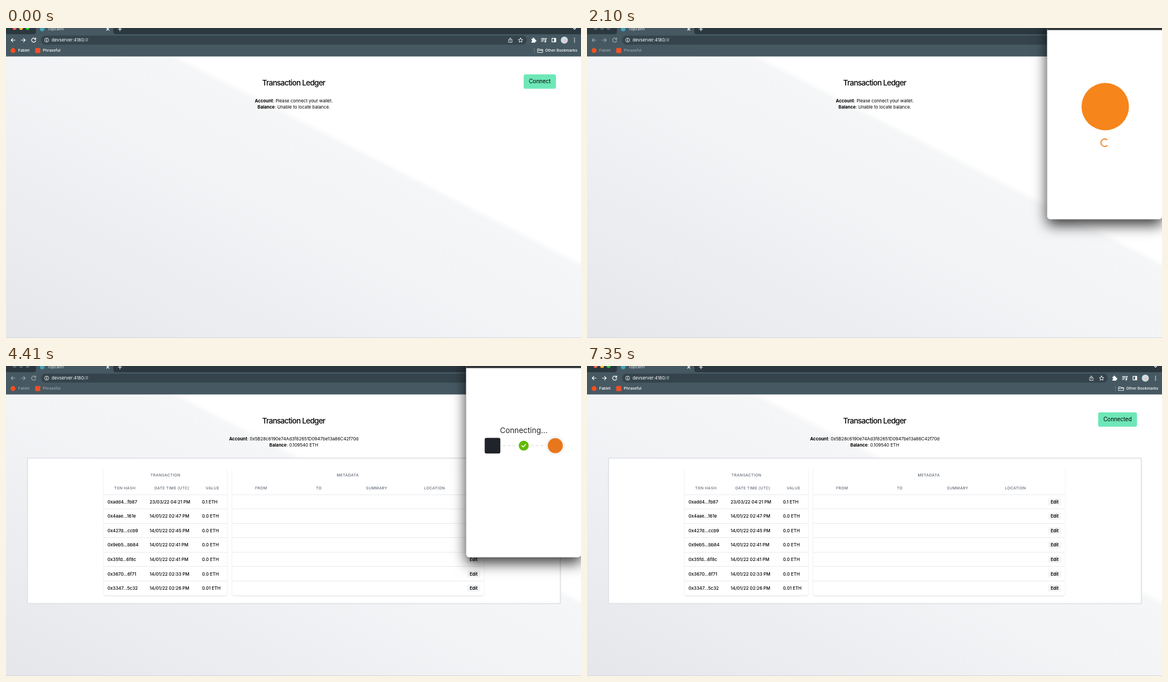
Write an HTML page that moves like this. It is 1018 px wide and 550 px high and loops after 7490 ms.

```html
<!DOCTYPE html>
<html lang="en">
<head>
<meta charset="utf-8">
<title>Transaction Ledger</title>
<style>
  html, body { margin: 0; width: 100%; height: 100%; overflow: hidden; }
  body { background: #fff; }
  svg { display: block; width: 1018px; height: 550px; font-family: Inter, "Open Sans", sans-serif; }
  text { white-space: pre; }
  .line { fill: none; stroke: #fff; stroke-width: 1.2; stroke-linecap: round; stroke-linejoin: round; }
  .blurred .chrome { opacity: .45; }
  .mid { text-anchor: middle; }
  .bold { font-weight: 700; }
  .semi { font-weight: 600; }
  .medium { font-weight: 500; }
  .head { text-anchor: middle; font-weight: 500; letter-spacing: .05em; fill: #636b78; }
  .window { filter: drop-shadow(0 0 .6px rgba(0,0,0,.5)) drop-shadow(0 10px 12px rgba(0,0,0,.78)); }
  .sheet { filter: drop-shadow(0 1px 1px rgba(0,0,0,.13)); }
</style>
</head>
<body>
<svg id="stage" viewBox="0 0 1018 550"></svg>
<script>
const LOOP = 7490, STEP = 70;
const OPEN = 840, READY = 2240, NEXT = 3500, LINKING = 3920, LINKED = 4060, DONE = 5180, CLOSED = 5320;
const ADDRESS = '0x5B28c6190e74Ad3f82651D0947be13a86C42f70d';
const SHORT = '0x5B2...f70d';
const HOST = 'devserver:4180';

// y is the middle of the capital letters
const txt = (x, y, size, s, cls = '', more = '') =>
  `<text x="${x}" y="${(y + size * .36).toFixed(2)}" font-size="${size}" class="${cls}" ${more}>${s}</text>`;
const rect = (x, y, w, h, fill, r = 0, more = '') =>
  `<rect x="${x}" y="${y}" width="${w}" height="${h}" fill="${fill}" rx="${r}" ${more}/>`;
const dot = (x, y, r, fill, more = '') => `<circle cx="${x}" cy="${y}" r="${r}" fill="${fill}" ${more}/>`;
const line = (d, more = '') => `<path class="line" d="${d}" ${more}/>`;
const rule = (x, y, w, color) => rect(x, y, w, 1, color);
const during = (from, to, s) => `<g data-from="${from}" data-to="${to}">${s}</g>`;
const outside = (from, to, s) => during(0, from, s) + during(to, LOOP, s);

function backdrop() {
  // The gradient follows the diagonal of the page, which is a little taller than the view
  const w = 1018, h = 522, k = w * h / (w * w + h * h);
  const x = h * k, y = w * k, middle = 50 + h / 2;
  return `<linearGradient id="sky" gradientUnits="userSpaceOnUse"
      x1="${w / 2 - x}" y1="${middle + y}" x2="${w / 2 + x}" y2="${middle - y}">
      <stop offset="0" stop-color="#e5e6ea"/><stop offset=".5" stop-color="#f3f4f6"/>
      <stop offset=".64" stop-color="#f5f6f7"/><stop offset=".652" stop-color="#fff"/>
    </linearGradient>` + rect(0, 50, w, h, 'url(#sky)') + rule(0, 549, w, '#d3d5d8');
}

function browser() {
  const lights = colors => colors.map((c, i) => dot(15.2 + i * 11.5, 0, 3.4, c)).join('');
  const nav = line('M16 21.5H9.2M12.3 18.3l-3.2 3.2 3.2 3.2M27.2 21.5H34M30.9 18.3l3.2 3.2-3.2 3.2') +
    line('M52 19.3a3.7 3.7 0 1 0 .6 3.2M52.6 17.6v2.5h-2.5');
  const tools =
    '<path fill="#fff" d="M930.3 19.2h2.1a1.4 1.4 0 1 1 2.6 0h2v2.2a1.4 1.4 0 1 1 0 2.6v2h-6.7v-2.1a1.3 1.3 0 1 0 0-2.6z"/>' +
    line('M948 18.7h6M948 21.2h6M948 23.7h3M955.6 18.7v5.3M955.6 18.7h1.5') + dot(954.6, 24.2, 1.3, '#fff') +
    line('M966.6 18.3h6.8v6.4h-6.8z') + rect(970.4, 18.3, 3, 6.4, '#fff') +
    [18.3, 21.5, 24.7].map(y => dot(1006.5, y, .9, '#fff')).join('');
  const marks = txt(21.5, 39.8, 6.85, 'Fablet') + txt(65.3, 39.8, 6.85, 'Phraseful') +
    txt(954.5, 39.8, 6.85, 'Other Bookmarks');
  return rect(0, 0, 1018, 12, '#2b383f') +
    '<path fill="#465962" d="M49 11q4 0 4-4V-3H190V7q0 4 4 4z"/>' + rect(0, 11, 1018, 39.5, '#465962') +
    rect(62, 13.5, 860, 16, '#35444c', 8) +
    outside(OPEN, CLOSED, lights(['#ff5f57', '#febc2e', '#28c840'])) +
    during(OPEN, CLOSED, lights(['#55626a', '#55626a', '#55626a'])) +
    dot(64, 1.8, 4, '#43a5bd') + txt(73, 1.8, 7, 'Topcairn', '', 'fill="#e8ecee"') +
    line('M178.2 0l4 4M182.2 0l-4 4M198.7 2h6M201.7-1v6M1004.3 0l2.3 2.3 2.3-2.3') +
    `<g class="chrome" fill="#fff" font-weight="500">${nav + tools + marks}</g>` +
    line('M72 21.2v2M72 19.3v.1', 'stroke-width="1"') + dot(72, 21.5, 3.6, 'none', 'stroke="#dde3e6"') +
    txt(80.8, 21.6, 7.8, `${HOST}<tspan fill="#b3bdc2">/#</tspan>`, '', 'fill="#fff"') +
    line('M891.5 20.5h-1.6v5h6v-5h-1.6M892.9 23.2v-5.4M891.3 19.2l1.6-1.6 1.6 1.6', 'style="stroke-width:.8"') +
    line('M911 17.6l1.2 2.6 2.8.3-2.1 1.9.6 2.8-2.5-1.4-2.5 1.4.6-2.8-2.1-1.9 2.8-.3z', 'style="stroke-width:.9"') +
    dot(988.5, 21.5, 6.2, '#cbdfe6') + dot(989.5, 22.8, 3, '#e3c9cb') +
    dot(12.5, 40, 4.4, '#f4501f') + rect(51.7, 35.5, 9, 9, '#f1502b', 1) +
    rect(935, 35.5, 1, 9, '#687980') +
    line('M941.5 37h3l1 1.2h4.6v5.2h-8.6zM941.5 39.6h8.6', 'style="stroke-width:.9"');
}

function button(label, x, hover) {
  return rect(x, 82.3, 973.7 - x, 25.4, hover ? '#34d399' : '#6ee7b7', 3) +
    txt((x + 973.7) / 2, 95, 9.7, label, 'mid');
}

function summary(account, balance) {
  return txt(509.5, 129, 7.8, `<tspan class="bold">Account</tspan>: ${account}`, 'mid') +
    txt(509.5, 140.3, 7.8, `<tspan class="bold">Balance</tspan>: ${balance}`, 'mid');
}

function table() {
  const rows = [
    ['add4...fb87', '23/03/22 04:21', '0.1'], ['4aae...161e', '14/01/22 02:47', '0.0'],
    ['427d...ccb9', '14/01/22 02:45', '0.0'], ['9eb5...bb84', '14/01/22 02:41', '0.0'],
    ['35fd...6f8c', '14/01/22 02:41', '0.0'], ['3670...6f71', '14/01/22 02:33', '0.0'],
    ['3347...5c32', '14/01/22 02:26', '0.01']
  ];
  const heads = [['TXN HASH', 210.3], ['DATE TIME (UTC)', 293.7], ['VALUE', 365.7], ['FROM', 451.6],
    ['TO', 553.8], ['SUMMARY', 656.2], ['LOCATION', 758.7]];
  return rect(38, 163.5, 943.5, 258, '#fff', 1, 'stroke="#e2e3e8" stroke-width="2"') +
    rect(173, 182, 218.5, 225, '#fff', 4, 'class="sheet"') + rect(400.5, 182, 445.5, 225, '#fff', 4, 'class="sheet"') +
    txt(282.3, 194, 6.8, 'TRANSACTION', 'head') + txt(605, 194, 6.8, 'METADATA', 'head') +
    heads.map(([s, x]) => txt(x, 216.7, 6.8, s, 'head')).join('') +
    rows.map(([hash, date, value], i) => {
      const y = 241 + i * 25.55, top = Math.round(y - 13.3);
      return rule(173, top, 218.5, '#e8eaed') + rule(400.5, top, 445.5, '#e8eaed') +
        txt(179.7, y, 7.8, '0x' + hash, 'medium') + txt(254.3, y, 7.8, date + ' PM', 'medium') +
        txt(347, y, 7.8, value + ' ETH', 'medium') +
        rect(816.5, y - 6, 23, 12, '#f3f4f6', 2) + txt(828, y, 7.7, 'Edit', 'mid semi');
    }).join('');
}

function walletPage(step, body, label) {
  const site = rect(862.5, 24.5, 112, 26, '#fff', 13, 'stroke="#f3f4f5"') + rect(864, 28.3, 18.4, 18.4, '#20232a', 2) +
    txt(886.7, 37.5, 7.7, 'http://' + HOST, '', 'fill="#6a737d"');
  return site + body +
    txt(1010, 17, 6.6, step + ' of 2', 'semi', 'fill="#535a61" text-anchor="end"') +
    txt(844.7, 283.5, 6.6, 'Only connect with sites you trust.', '', 'fill="#6a737d"') +
    txt(952, 283.5, 6.6, 'Learn more', '', 'fill="#0376c9"') +
    rule(814.5, 295, 203.5, '#d6d9dc') +
    rect(824, 305.3, 70, 25, '#fff', 12.5, 'stroke="#8b929a"') +
    during(3850, LINKING, rect(824, 305.3, 70, 25, '#e8e9eb', 12.5, 'stroke="#7d848b"')) +
    txt(858.7, 318, 8.2, 'Cancel', 'mid', 'fill="#6a737d"') +
    rect(939.5, 305, 70.5, 25.5, '#0562a8', 12.75) +
    during(READY, 3150, rect(939.5, 305, 70.5, 25.5, '#0376c9', 12.75)) +
    during(3290, 3360, rect(939.5, 305, 70.5, 25.5, '#03528c', 12.75)) +
    during(3640, 3710, rect(939.5, 305, 70.5, 25.5, '#03528c', 12.75)) +
    txt(974.8, 318, 8.2, label, 'mid medium', 'fill="#fff"');
}

function wallet() {
  const dark = 'fill="#24272a"';
  const loading = dot(917.5, 139.5, 42, '#f6851b') +
    '<path id="spinner" d="M923.3 203.5a6.7 6.7 0 1 1-6.7-6.7" fill="none" stroke="#f0862a" stroke-width="1.9"/>';
  const choose = txt(916.5, 71, 13.2, 'Connect With Wallet', 'mid bold', dark) +
    txt(916.5, 90, 7.8, 'Select the account(s) to use on this site', 'mid', dark) +
    txt(1006, 122, 7.2, 'New Account', '', 'fill="#0376c9" text-anchor="end"') +
    rect(828.5, 131.5, 177, 34, '#fff', 4, 'stroke="#d6d9dc"') +
    rect(836, 144, 9, 9, '#0376c9', 1.5) + line('M838 148.5l1.9 1.9 3.2-3.5') +
    dot(859, 148.5, 8, '#3fb8b0') +
    txt(873, 144, 7.6, `Account 1 (${SHORT})`, '', dark) + txt(873, 154, 7, '0.109540 ETH', '', 'fill="#6a737d"');
  const confirm = line('M827 14.5l-2.4 2.5 2.4 2.5', 'style="stroke:#535a61"') +
    txt(833.3, 17, 7, 'Back', 'semi', 'fill="#535a61"') +
    txt(916.7, 71, 13.2, 'Connect to Account 1', 'mid bold', dark) + txt(916.7, 90, 13, `(${SHORT})`, 'mid bold', dark) +
    txt(916.7, 106.5, 7.8, 'Allow this site to:', 'mid', dark) +
    '<path d="M837.2 147.5q4.8-7 9.8 0q-5 7-9.8 0z" fill="#5d656d"/>' + dot(842.1, 147.5, 2.2, '#fff') + dot(842.1, 147.5, 1.2, '#5d656d') +
    txt(851.8, 142, 7.9, 'See address, account balance, activity', '', dark) +
    txt(851.8, 153, 7.9, 'and suggest transactions to approve', '', dark) + rule(828, 170, 178, '#d6d9dc');
  const linking = txt(916.6, 114, 13.4, 'Connecting...', 'mid', dark) +
    rect(847.5, 127.5, 27.7, 27.7, '#20232a', 3) +
    line('M880 141.3H906M930 141.3H956', 'style="stroke:#cdd1d6;stroke-width:1;stroke-dasharray:4 4.5"') +
    dot(916.6, 141.2, 8.8, '#61ba00') + line('M913.2 141.4l2.4 2.4 4.4-4.8', 'style="stroke-width:1.5"') +
    dot(972.5, 141.3, 17, '#f4f4f5') + dot(972.5, 141.3, 13.3, '#e8761b');
  return rect(814.5, -20, 204, 359.4, '#fff', 6, 'class="window"') + rect(814.5, 0, 204, 3.7, '#2d3236') +
    during(OPEN, READY, loading) +
    during(READY, NEXT, walletPage(1, choose, 'Next')) +
    during(NEXT, LINKING, walletPage(2, confirm, 'Connect')) +
    during(LINKING, DONE, linking);
}

const stage = document.getElementById('stage');
stage.innerHTML = backdrop() + browser() +
  txt(509.3, 96.7, 13.5, 'Transaction Ledger', 'mid medium', 'letter-spacing="-.75"') +
  during(0, LINKED, summary('Please connect your wallet.', 'Unable to locate balance.')) +
  during(0, 140, button('Connect', 916.5)) +
  during(140, LINKED, button('Connect', 916.5, true)) +
  during(LINKED, LOOP, summary(ADDRESS, '0.109540 ETH') + table() + button('Connected', 905)) +
  during(OPEN, CLOSED, wallet());

const parts = [...stage.querySelectorAll('[data-from]')];
const spinner = document.getElementById('spinner');

function draw() {
  const t = performance.now() % LOOP;
  for (const p of parts) p.style.display = t >= +p.dataset.from && t < +p.dataset.to ? '' : 'none';
  stage.classList.toggle('blurred', t >= OPEN && t < CLOSED + STEP);
  const tick = Math.floor(t / STEP) * STEP;
  spinner.setAttribute('transform', `rotate(${(tick - 980) * .36} 916.6 203.5)`);
  requestAnimationFrame(draw);
}
draw();
</script>
</body>
</html>
```
